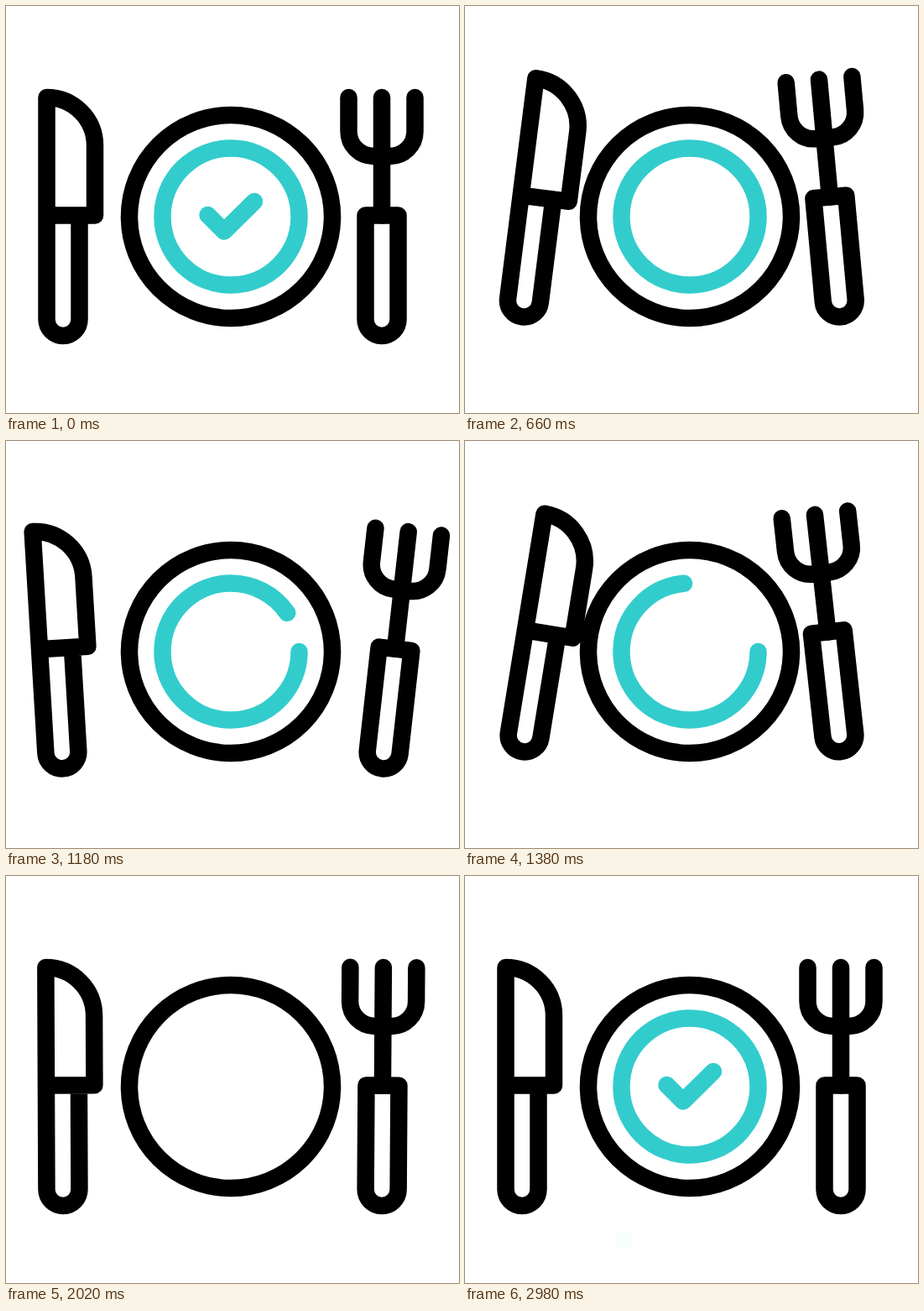
These frames come from a looping animation (540x485 px, 3.08 s). An HTML page:

```html
<!DOCTYPE html>
<html lang="en">
<head>
<meta charset="utf-8">
<title>Place setting</title>
<style>
  html, body { margin: 0; width: 100%; height: 100%; overflow: hidden; background: #fff; }
  svg { display: block; width: 100%; height: 100%; }
  path, circle { fill: none; stroke: #000; stroke-width: 20.5; stroke-linecap: round; stroke-linejoin: round; }
  .teal { stroke: #3cc; }
  #sparks circle { fill: #3cc; stroke: none; }
</style>
</head>
<body>
<svg viewBox="0 0 540 485">
  <g id="sparks"></g>
  <circle cx="268" cy="251" r="121"/>
  <path id="ring" class="teal" pathLength="1" d="M349.5 251a81.5 81.5 0 0 1 -163 0a81.5 81.5 0 0 1 163 0"/>
  <path id="check" class="teal" pathLength="1" d="M240.5 249L260 268.5L296 233"/>
  <g id="knife">
    <path d="M48.5 249.5V109A57.5 57.5 0 0 1 106 166.5V249.5H48.5V373.5A19.5 19.5 0 0 0 87.5 373.5V249.5"/>
  </g>
  <g id="fork">
    <path d="M408.5 109V149.5A29.5 29.5 0 0 0 438 179H458A29.5 29.5 0 0 0 487.5 149.5V109M448 109V249.5"/>
    <path d="M428.5 249.5H467.5V373.5A19.5 19.5 0 0 1 428.5 373.5Z"/>
  </g>
</svg>
<script>
const LOOP = 3080;
const get = id => document.getElementById(id);
const clamp = x => Math.min(1, Math.max(0, x));
const ease = u => (1 - Math.cos(Math.PI * u)) / 2;
const progress = (t, from, to) => clamp((t - from) / (to - from));

// Eased interpolation through matching lists of times and values.
function keyed(t, times, values) {
  let value = values[0];
  for (let i = 1; i < times.length; i++) {
    value += (values[i] - values[i - 1]) * ease(progress(t, times[i - 1], times[i]));
  }
  return value;
}

const hopTimes = [412, 684, 1026, 1368, 1709, 1978];
const swingTimes = [498, 769, 1111, 1454, 1791, 2058];

// Direction in degrees from straight up, final distance, start delay.
const sparks = [
  [0, 217, 0], [25, 206, 20], [-25.5, 212, 10],
  [180, 206, 10], [157, 200, 0], [203.2, 199, 40]
].map(([angle, reach, delay]) => {
  const dot = document.createElementNS("http://www.w3.org/2000/svg", "circle");
  get("sparks").append(dot);
  return { dot, reach, delay, angle: angle * Math.PI / 180 };
});

function trim(id, amount) {
  const style = get(id).style;
  style.visibility = amount > 0.001 ? "visible" : "hidden";
  style.strokeDasharray = amount < 1 ? `${amount} 2` : "none";
}

function pose(id, x, y, angle) {
  get(id).setAttribute("transform", `translate(0 ${y}) rotate(${angle} ${x} 393)`);
}

function draw(t) {
  const y = keyed(t, hopTimes, [0, -23, 12.5, -23, 12.5, 0]);
  pose("knife", 68, y, keyed(t, swingTimes, [0, 11, -5, 11, -5, 0]));
  pose("fork", 448, y, keyed(t, swingTimes, [0, -8, 8, -8, 8, 0]));

  trim("check", t < 1000 ? 1 - ease(progress(t, 410, 640)) : ease(progress(t, 2340, 2540)));
  trim("ring", t < 2020 ? 1 - progress(t, 1000, 2015) ** 1.36 : ease(progress(t, 2030, 2400)));

  for (const { dot, reach, delay, angle } of sparks) {
    const u = progress(t, 2420 + delay, 2950 + delay);
    const distance = 140 + (reach - 140) * (1 - (1 - u) ** 2);
    dot.setAttribute("cx", 268 + distance * Math.sin(angle));
    dot.setAttribute("cy", 251 - distance * Math.cos(angle));
    dot.setAttribute("r", 10.5 * clamp(u * 6));
    dot.setAttribute("opacity", clamp((1 - u) * 2));
  }
}

function tick() {
  draw(performance.now() % LOOP);
  requestAnimationFrame(tick);
}
tick();
</script>
</body>
</html>
```
